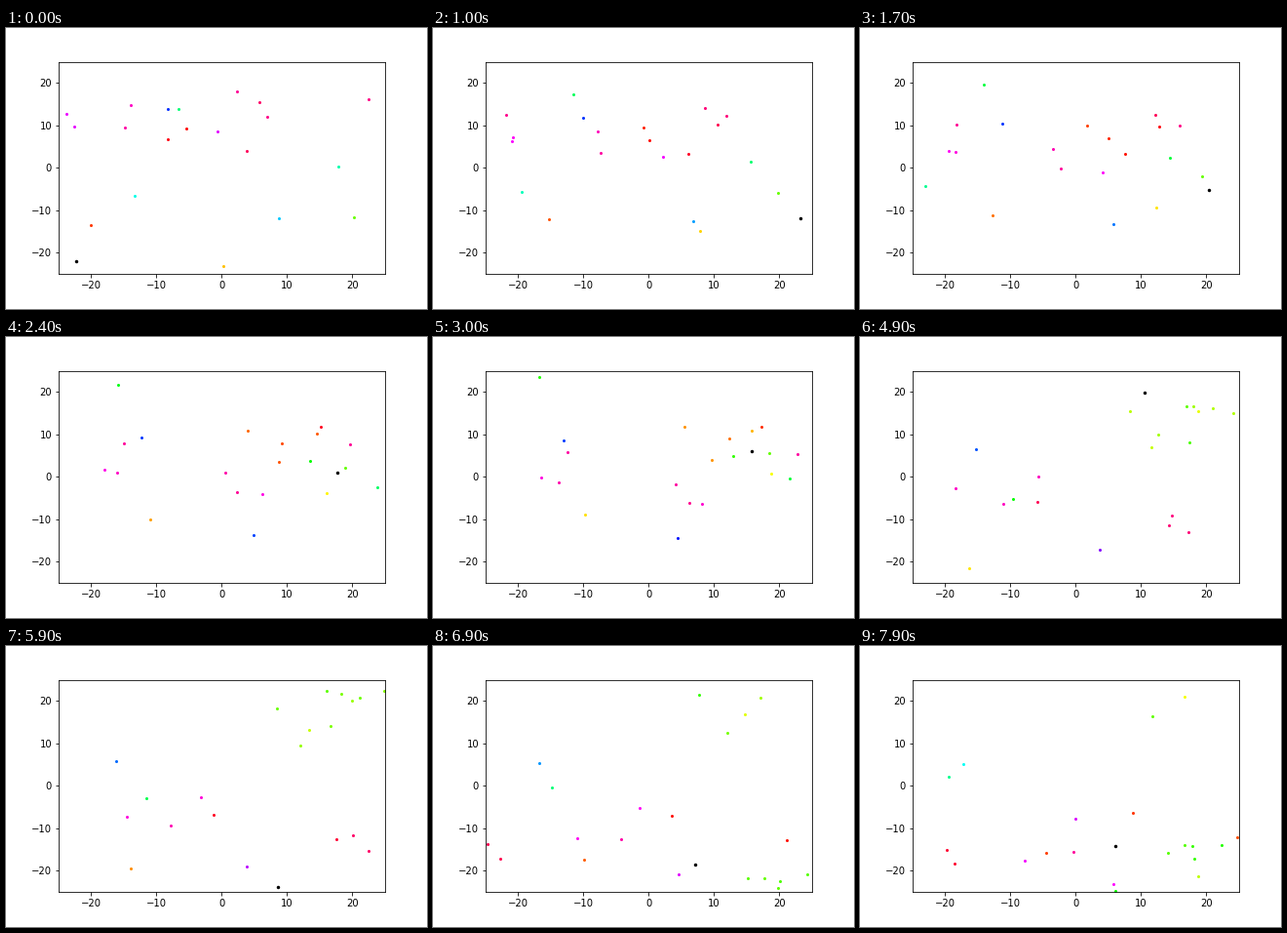
Animation of 432 by 288 pixels, one loop 8000 ms. Source, as a matplotlib script:

```python
import numpy as np
import matplotlib.pyplot as plt
from matplotlib.animation import FuncAnimation
from matplotlib.colors import hsv_to_rgb

FRAMES, INTERVAL = 80, 100
HALF = 25
BEATS = 0, 37, 79

# Start, middle and end of each flight, unwrapped past the box edge.
# The first one is the leader.
FLIGHTS = np.array([
    [(-22.3, -22), (-36.4, 11.5), (-43.9, 35.8)],
    [(-23.8, 12.7), (-11, -3.3), (8.8, -6.4)],
    [(-22.6, 9.7), (-14.7, -2.5), (-0.3, -15.6)],
    [(-14, 14.7), (8.1, -4.8), (30.3, -15.1)],
    [(-14.8, 9.4), (10.5, -9), (31.4, -18.4)],
    [(-8.3, 13.8), (-14, 7.6), (-17.3, 5.2)],
    [(-6.6, 13.8), (-17.3, 25.4), (-4.5, 34.3)],
    [(-8.3, 6.7), (15.3, 11), (18.2, 32.8)],
    [(-5.4, 9.2), (6.9, 12.9), (6.1, 25.3)],
    [(-0.7, 8.6), (10.3, -8.7), (24.8, -12.2)],
    [(2.4, 18), (19.1, 12.6), (17.9, 35.8)],
    [(5.7, 15.4), (26.2, 2.5), (42.1, -17.7)],
    [(7, 12), (16.9, 12.4), (16.6, 36)],
    [(3.8, 4), (10.5, 4.8), (11.7, 16.3)],
    [(22.5, 16.1), (40.3, 3.7), (49.9, -7.8)],
    [(17.9, 0.3), (12.6, 6.6), (16.7, 20.9)],
    [(-13.4, -6.7), (-30.4, 2.3), (-31.3, 28.7)],
    [(-20.1, -13.5), (-9.2, -7.6), (-19.5, 2.1)],
    [(0.3, -23.2), (21.3, 6.2), (22.4, 36)],
    [(8.8, -12), (3.9, -15.4), (5.7, -23.2)],
    [(20.3, -11.7), (17.9, 9.6), (14.2, 34.1)],
])

# One parabola in time per coordinate: position = a t^2 + b t + c
keys = FLIGHTS.transpose(1, 0, 2).reshape(len(BEATS), -1)
a, b, c = np.polyfit(BEATS, keys, 2).reshape(3, -1, 2)


def place(t):
    pos = a * t**2 + b * t + c
    return (pos + HALF) % (2 * HALF) - HALF


def tint(t):
    """Hue follows the direction of flight; red points right."""
    vx, vy = (2 * a * t + b).T
    hue = np.arctan2(vy, vx) / (2 * np.pi) % 1
    full = np.ones_like(hue)
    return hsv_to_rgb(np.column_stack([hue, full, full]))


plt.rcParams.update({"font.family": "DejaVu Sans", "font.size": 10})
fig = plt.figure(figsize=(6, 4), dpi=72, facecolor="white")
ax = fig.add_axes([0.125, 0.125, 0.775, 0.755])
ax.set(xlim=(-HALF, HALF), ylim=(-HALF, HALF),
       xticks=range(-20, 21, 10), yticks=range(-20, 21, 10))

leader, = ax.plot([], [], "o", color="black", ms=3.46, mew=0, zorder=3)
birds = [ax.plot([], [], "o", ms=2, mew=1)[0] for _ in FLIGHTS[1:]]


def draw(t):
    pos, colors = place(t), tint(t)
    for dot, (x, y) in zip([leader, *birds], pos):
        dot.set_data([x], [y])
    for dot, color in zip(birds, colors[1:]):
        dot.set_color(color)
    return [leader, *birds]


anim = FuncAnimation(fig, draw, frames=FRAMES, interval=INTERVAL,
                     repeat=True, repeat_delay=0)
plt.show()
```
